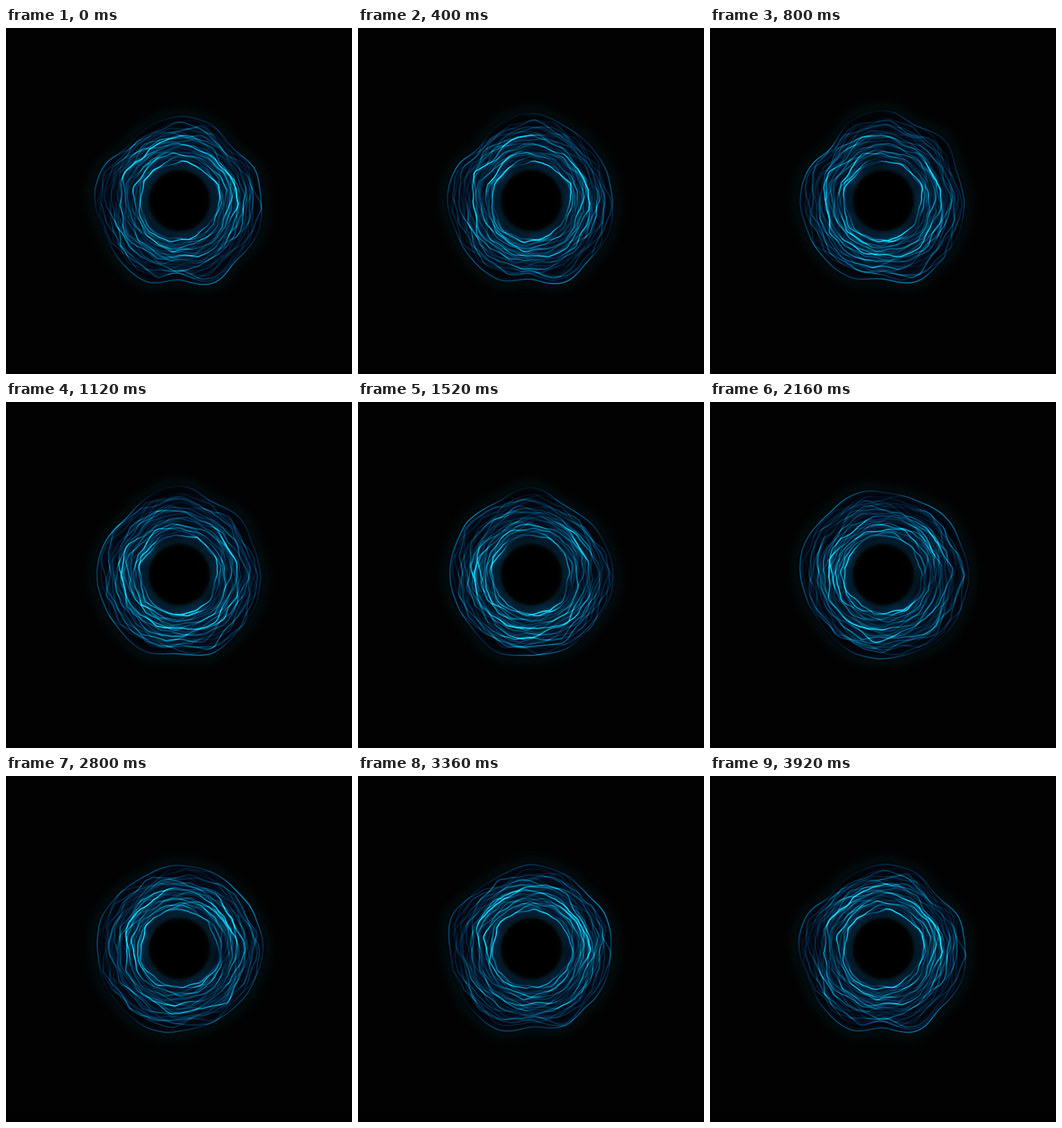
Animation of 480 by 480 pixels, one loop 4 s. Source, as an HTML page with a canvas:

```html
<!DOCTYPE html>
<html>
<head>
<meta charset="utf-8">
<style>
html, body { margin: 0; height: 100%; overflow: hidden; background: #020202; }
canvas { display: block; width: 480px; height: 480px; }
</style>
</head>
<body>
<canvas id="stage" width="480" height="480"></canvas>
<script>
const LOOP = 4000, STEP = 80, TAU = Math.PI * 2;
const CX = 240, CY = 239, HALF = 140, SIZE = HALF * 2, ANGLES = 1440;
const ctx = document.getElementById('stage').getContext('2d');
const image = ctx.createImageData(SIZE, SIZE);

// Rim radius every 22.5 degrees, clockwise from the right, at each pose time
const poseTimes = [0, 800, 1520, 2160, 2800, 3360, LOOP];
const poses = [
  [113, 117, 114, 125, 111, 121, 116, 113, 116, 116, 105, 110, 117, 115, 105, 112],
  [113, 113, 115, 122, 110, 115, 114, 113, 114, 114, 104, 119, 124, 114, 119, 109],
  [115, 113, 110, 113, 112, 116, 112, 111, 112, 114, 115, 112, 120, 107, 107, 111],
  [119, 118, 119, 115, 116, 115, 112, 111, 115, 117, 114, 118, 114, 113, 116, 116],
  [116, 114, 111, 112, 114, 118, 115, 115, 114, 115, 112, 111, 116, 116, 113, 114],
  [110, 112, 110, 117, 109, 121, 118, 113, 113, 118, 110, 109, 117, 114, 109, 112]
];

let seed = 29;
function random() {
  seed = (seed * 16807) % 2147483647;
  return seed / 2147483647;
}

function makeRing(base, gain, tip = 0) {
  const waves = [2, 3, 5, 7, 11, 17].map((m, i) => ({
    m, phase: random() * TAU, turns: Math.floor(random() * 3) - 1,
    size: [0.7, 0.8, 0.8, 0.7, 0.4, 0.22][i]
  }));
  const light = [1, 3, 5].map(m => ({ m, phase: random() * TAU, turns: Math.floor(random() * 3) - 1 }));
  return {
    base, gain, tip, waves, light,
    radius: new Float32Array(ANGLES), slope: new Float32Array(ANGLES), glow: new Float32Array(ANGLES)
  };
}

const rim = makeRing(114, 0.5);
const rings = [
  rim, makeRing(54, 0.75), makeRing(57, 0.6), makeRing(64, 0.6), makeRing(70, 0.5),
  makeRing(78, 0.75), makeRing(84, 0.6, 6), makeRing(92, 0.45), makeRing(102, 0.35)
];
for (let i = 0; i < 20; i++) rings.push(makeRing(56 + i * 2.7, 0.14 + random() * 0.16));

// Polar coordinates of every pixel in the drawn square
const polarR = new Float32Array(SIZE * SIZE), polarA = new Uint16Array(SIZE * SIZE);
for (let i = 0; i < SIZE * SIZE; i++) {
  const x = i % SIZE - HALF, y = Math.floor(i / SIZE) - HALF;
  polarR[i] = Math.hypot(x, y);
  polarA[i] = Math.round((Math.atan2(y, x) / TAU + 1) * ANGLES) % ANGLES;
}

function rimShape(ms) {
  let i = 0;
  while (ms >= poseTimes[i + 1]) i++;
  const u = (ms - poseTimes[i]) / (poseTimes[i + 1] - poseTimes[i]);
  const ease = (1 - Math.cos(Math.PI * u)) / 2;
  const next = poses[(i + 1) % poses.length];
  const points = poses[i].map((r, k) => r + (next[k] - r) * ease);
  return angle => {
    const f = angle / ANGLES * 16, k = Math.floor(f), s = f - k;
    const [a, b, c, d] = [15, 0, 1, 2].map(o => points[(k + o) % 16]);
    return b + s * (c - a + s * (2 * a - 5 * b + 4 * c - d + s * (3 * (b - c) + d - a))) / 2;
  };
}

const crease = x => 1.27 - 2 * Math.abs(Math.sin(x / 2));

function shapeRings(ms) {
  const turn = ms / LOOP * TAU, outline = rimShape(ms);
  const edge = Float32Array.from({ length: ANGLES }, (_, a) => outline(a));
  for (const ring of rings) {
    const pull = ((ring.base - 54) / 60) ** 2;
    const amp = ring === rim ? 0.8 : 1.6 + (ring.base - 54) * 0.04;
    for (let a = 0; a < ANGLES; a++) {
      const th = a / ANGLES * TAU;
      let r = ring.base + (edge[a] - 114) * pull, lit = 0.45;
      for (const w of ring.waves) r += amp * w.size * crease(w.m * th + w.phase + w.turns * turn);
      for (const w of ring.light) lit += 0.25 * Math.sin(w.m * th + w.phase + w.turns * turn);
      if (ring.tip) {
        const off = Math.min(th, TAU - th);
        r += ring.tip * (1 - Math.cos(turn)) * Math.max(0, 1 - off / 0.6);
      }
      ring.radius[a] = Math.max(r, 50 + (ring.base - 54) * 0.1);
      ring.glow[a] = ring.gain * (0.2 + 0.9 * Math.max(0, lit));
    }
    for (let a = 0; a < ANGLES; a++) {
      const rise = ring.radius[(a + 3) % ANGLES] - ring.radius[(a + ANGLES - 3) % ANGLES];
      ring.slope[a] = 1 / Math.hypot(1, rise / (6 * TAU / ANGLES * ring.radius[a]));
    }
  }
}

function draw(ms) {
  shapeRings(ms);
  const px = image.data;
  for (let i = 0; i < polarR.length; i++) {
    const r = polarR[i], a = polarA[i], out = r - rim.radius[a];
    let v = 0;
    if (r > 42 && out < 6) {
      for (const ring of rings) {
        const d = (r - ring.radius[a]) * ring.slope[a];
        if (d < -24 || d > 4) continue;
        let level = Math.exp(-d * d * 1.3);
        level += d < 0 ? 0.2 * Math.exp(d / 8) : 0.2 * Math.exp(-d * 1.3);
        v += ring.glow[a] * level;
      }
      v = Math.min(v, 1);
    }
    const halo = 20 * Math.exp(-(((r - 46) / 5) ** 2)) + 9 * Math.exp(-(((out - 6) / 8) ** 2));
    const floor = r < 42 ? 0 : 2;
    px[i * 4] = floor + 20 * v ** 3;
    px[i * 4 + 1] = floor + halo * 0.85 + 212 * v ** 1.3;
    px[i * 4 + 2] = floor + halo + 240 * v;
    px[i * 4 + 3] = 255;
  }
  ctx.fillStyle = '#020202';
  ctx.fillRect(0, 0, 480, 476);
  ctx.fillStyle = '#000';
  ctx.fillRect(0, 476, 480, 4);
  ctx.putImageData(image, CX - HALF, CY - HALF);
}

let shown = -1;
function tick() {
  const ms = Math.floor(performance.now() % LOOP / STEP) * STEP;
  if (ms !== shown) draw(shown = ms);
  requestAnimationFrame(tick);
}
tick();
</script>
</body>
</html>
```
